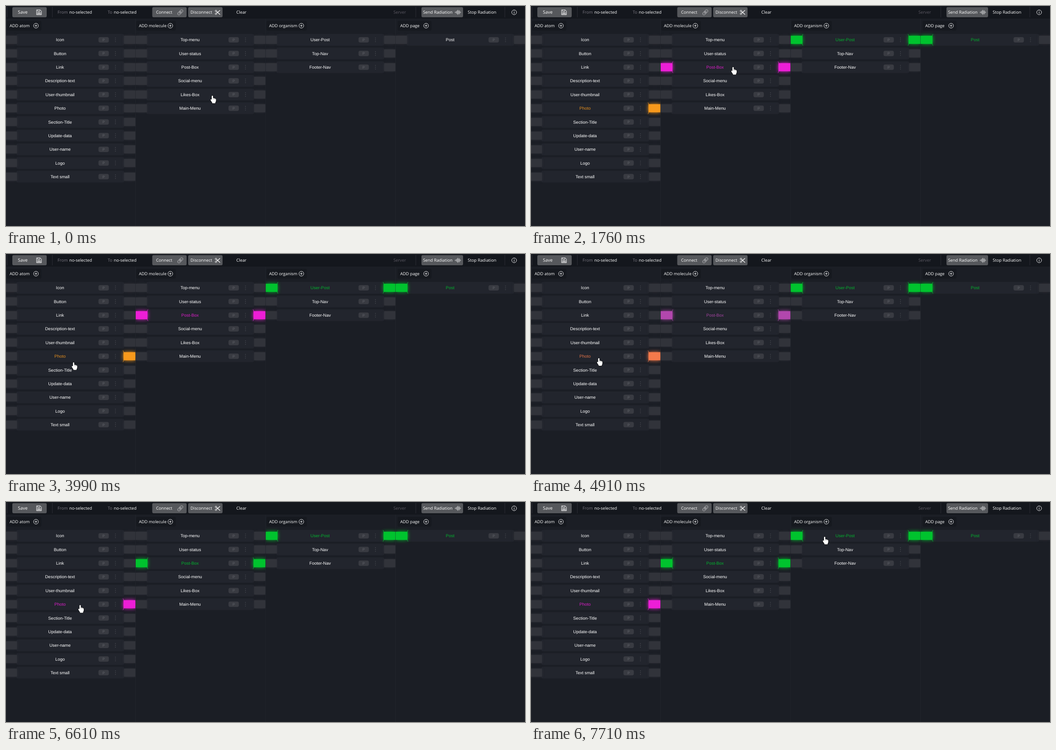
Animation, 1148 px wide and 488 px high, one loop 8 s. Source, as an HTML page with a canvas:

```html
<!DOCTYPE html>
<html lang="en">
<head>
<meta charset="utf-8">
<title>Atomic design board</title>
<style>
  html, body { margin: 0; width: 1148px; height: 488px; overflow: hidden; background: #1b1e25; }
  canvas { display: block; }
</style>
</head>
<body>
<canvas id="stage" width="1148" height="488"></canvas>
<script>
const ctx = document.getElementById('stage').getContext('2d');
const LOOP = 8000, PITCH = 287.6, ROW = 30.36;
const UI = '"Open Sans", "Noto Sans", sans-serif';
const ITEM = '"Liberation Sans", Arial, sans-serif';
const WHITE = [255, 255, 255], GRAY = [49, 51, 58], HOVER = [80, 82, 88];
const GREEN = [0, 195, 46], PINK = [237, 30, 215], ORANGE = [247, 153, 28];

const columns = [
  ['Icon', 'Button', 'Link', 'Description-text', 'User-thumbnail', 'Photo',
    'Section-Title', 'Update-data', 'User-name', 'Logo', 'Text small'],
  ['Top-menu', 'User-status', 'Post-Box', 'Social-menu', 'Likes-Box', 'Main-Menu'],
  ['User-Post', 'Top-Nav', 'Footer-Nav'],
  ['Post'],
];
// Highlight colours: after the first click, then after the second
const links = {
  'Photo': { colors: [ORANGE, PINK], right: true },
  'Post-Box': { colors: [PINK, GREEN], left: true, right: true },
  'User-Post': { colors: [GREEN, GREEN], left: true, right: true },
  'Post': { colors: [GREEN, GREEN], left: true },
};

// Pointer movement: [start, end, steps] and path points [time, x, y]
const moves = [[500, 910, 6], [3360, 4130, 11], [4380, 4530, 3], [4680, 4680, 1], [6550, 7330, 11], [7400, 7710, 5]];
const path = [
  [418, 456.5, 198.5], [500, 456, 194], [828, 448, 141], [910, 447, 135],
  [3283, 447, 135], [3437, 420, 148], [3745, 230, 205], [3899, 165, 234], [3976, 149.5, 240], [4130, 150, 233],
  [4303, 150, 233], [4530, 149.8, 232], [4680, 150, 230.8],
  [6472, 150, 230.8], [6628, 178, 226], [6784, 330, 205], [7018, 561, 165], [7096, 595.7, 136],
  [7174, 612, 120], [7330, 633, 97], [7710, 649.5, 76.8],
];

const rgb = c => `rgb(${c.map(Math.round)})`;
const mix = (a, b, p) => a.map((v, i) => v + (b[i] - v) * p);

function progress(t, start, end, steps) {
  if (t < start) return 0;
  return Math.min(1, (Math.floor((t - start) / (end - start) * (steps - 1) + 1e-6) + 1) / steps);
}

function snap(t) {
  let held = 0;
  for (const [start, end, steps] of moves) {
    if (t < start) break;
    const gap = (end - start) / (steps - 1 || 1);
    held = t >= end ? end : start + Math.floor((t - start) / gap) * gap;
  }
  return held;
}

function pointer(t) {
  const s = snap(t);
  const i = path.findIndex(k => k[0] > s);
  if (i === 0) return path[0].slice(1);
  if (i < 0) return path[path.length - 1].slice(1);
  const a = path[i - 1], b = path[i];
  return mix(a, b, (s - a[0]) / (b[0] - a[0])).slice(1);
}

function text(str, x, y, color, font, size, align = 'left') {
  ctx.font = `${size}px ${font}`;
  ctx.textAlign = align;
  ctx.fillStyle = color;
  ctx.fillText(str, x, Math.round(y));
}

function box(x, y, w, h, r, fill) {
  ctx.fillStyle = fill;
  ctx.beginPath();
  ctx.roundRect(x, y, w, h, r);
  ctx.fill();
}

function stroke(d, color, width = 1) {
  ctx.strokeStyle = color;
  ctx.lineWidth = width;
  ctx.stroke(new Path2D(d));
}

function circle(x, y, r, color) {
  ctx.strokeStyle = color;
  ctx.lineWidth = 1;
  ctx.beginPath();
  ctx.arc(x, y, r, 0, 7);
  ctx.stroke();
}

function at(x, y, draw) {
  ctx.save();
  ctx.translate(x, y);
  draw();
  ctx.restore();
}

function toolbar() {
  box(0, 0, 1148, 28, 0, '#14171d');
  for (const x of [2, 102, 906, 1103]) box(x, 2, 1, 23, 0, '#2a2c33');
  for (const [x, w] of [[14, 76], [323.5, 76], [403, 76], [919, 92]]) box(x, 2.5, w, 22.5, 3, '#56585c');
  const label = (str, x, color = '#fff', size = 9.3) => text(str, x, 17, color, UI, size);
  label('Save', 26.3, '#fff', 9.9);
  label('From', 114, '#7a7781');
  label('no-selected', 140);
  label('To', 225, '#7a7781');
  label('no-selected', 238.5);
  label('Connect', 332);
  label('Disconnect', 408);
  label('Clear', 509.5);
  label('Server', 857, '#5b5962');
  label('Send Radiation', 922.5);
  label('Stop Radiation', 1021.3);

  at(67, 8, () => stroke('M.6 .6H8.8L11.4 3.2V11.4H.6ZM3 .8V4.2H8V.8M2.6 11.2V6.8H9.4V11.2M4 8.4H8M4 9.9H8', '#f2f2f3'));
  at(385.5, 14, () => {
    ctx.rotate(-Math.PI / 4);
    ctx.strokeStyle = '#a3a4a7';
    ctx.lineWidth = 1.1;
    for (const x of [-7, -1.4]) {
      ctx.beginPath();
      ctx.roundRect(x, -2.8, 8.4, 5.6, 2.6);
      ctx.stroke();
    }
    stroke('M-4 0H4', '#a3a4a7');
  });
  at(462, 8.5, () => {
    circle(2.4, 2.4, 1.7, '#fff');
    circle(2.4, 8.8, 1.7, '#fff');
    stroke('M3.7 3.6L11.5 10.4M3.7 7.6L11.5 .9', '#fff', 1.3);
  });
  for (let i = 0; i < 9; i++) {
    const h = [1, 3, 5, 8, 11, 7, 9, 4, 1][i];
    box(992.5 + i * 1.65, 14 - h / 2, 0.9, h, 0, '#d5d6d8');
  }
  circle(1124, 14, 5.3, '#e9e9eb');
  stroke('M1124 13V17M1124 10.8V12', '#e9e9eb', 1.1);
}

function headers() {
  for (const [name, x, icon] of [['atom', 8, 66.3], ['molecule', 294, 363.5], ['organism', 582, 653.3], ['page', 872, 929.2]]) {
    box(x - 6, 33, icon - x + 18, 21.5, 3, '#16191f');
    text('ADD ' + name, x, 47, '#fff', UI, 9.25);
    circle(icon, 43.7, 5.3, '#e9e9eb');
    stroke(`M${icon - 2.8} 43.7h5.6M${icon} 40.9v5.6`, '#e9e9eb');
  }
}

// outer: x of the end at the column border; side: -1 left of the row, 1 right of it
function handle(outer, cy, side, color, lit, bracket) {
  const width = 24.8 + lit;
  const inner = outer - side * width;
  ctx.save();
  ctx.shadowColor = rgb(color);
  ctx.shadowBlur = 5 + 3 * lit;
  box(Math.min(outer, inner), cy - 9, width, 18, 0, rgb(color));
  ctx.restore();
  if (bracket) {
    ctx.save();
    ctx.globalAlpha = bracket.alpha * 0.85;
    const tip = inner - side * 1.8;
    stroke(`M${tip} ${cy - 12.6}Q${inner} ${cy - 12} ${inner} ${cy - 9.5}V${cy + 9.5}Q${inner} ${cy + 12} ${tip} ${cy + 12.6}`,
      rgb(bracket.color), 1);
    ctx.restore();
  }
}

// Hover fades out over the last few pointer positions
function hoverLevel(trail, left, cy) {
  return Math.max(...trail.map(([x, y], i) =>
    x > left && x < left + 25.5 && Math.abs(y - cy) < 9.5 ? [1, 0.35, 0.15][i] : 0));
}

function row(name, x, cy, first, second, trail) {
  const link = links[name];
  const tint = link && mix(link.colors[0], link.colors[1], second);
  box(x + 23, cy - 13, 238, 26, 3, '#22252d');
  for (const [side, outer, key] of [[-1, x - 0.8, 'left'], [1, x + 286, 'right']]) {
    if (link && link[key]) {
      handle(outer, cy, side, mix(GRAY, tint, first), first, first && { color: tint, alpha: first });
    } else {
      const hover = hoverLevel(trail, side < 0 ? outer : outer - 25, cy);
      handle(outer, cy, side, mix(GRAY, HOVER, hover), 0, hover && { color: WHITE, alpha: hover * hover });
    }
  }
  const textTint = link ? mix(WHITE, mix(tint, [34, 37, 45], 0.1), first) : WHITE;
  text(name, x + 119.5, cy + 3.4, rgb(textTint), ITEM, 9.5, 'center');
  box(x + 204.5, cy - 6, 23, 12, 4, '#393b42');
  text('P', x + 216, cy + 2.9, '#62646b', ITEM, 8, 'center');
  for (const dy of [-4, 0, 4]) box(x + 241.3, cy + dy - 0.8, 1.6, 1.6, 0.8, '#53555c');
}

function column(names, x, first, second, trail) {
  ctx.save();
  ctx.beginPath();
  ctx.rect(x - 0.8, 28, PITCH, 460);
  ctx.clip();
  names.forEach((name, i) => row(name, x, 75 + i * ROW, first, second, trail));
  ctx.restore();
}

function hand(x, y) {
  const shape = new Path2D('M-1.5 9V1.2Q0-.8 1.5 1.2V6Q3 5 4 6.4Q5.4 5.8 6.2 7.2Q8 6.8 8 8.6V11.5' +
    'Q8 14 6.5 15.5V17.3H-.3V16Q-2.5 13-4 10.3Q-4.3 8-2.8 8.4Z');
  at(x, y, () => {
    ctx.lineJoin = 'round';
    ctx.strokeStyle = '#000';
    ctx.lineWidth = 1.2;
    ctx.stroke(shape);
    ctx.fillStyle = '#fff';
    ctx.fill(shape);
    stroke('M1.6 6V9M4 6.8V9.2M6.2 7.6V9.4', '#555', 0.5);
  });
}

function draw() {
  const t = performance.now() % LOOP;
  const first = progress(t, 1610, 1760, 3), second = progress(t, 4910, 5140, 4);
  const trail = [0, 78, 156].map(ago => pointer(Math.max(0, t - ago)));
  ctx.textRendering = 'geometricPrecision';
  box(0, 0, 1148, 488, 0, '#1b1e25');
  toolbar();
  headers();
  for (const x of [286, 573.6, 861]) box(x, 28, 1, 460, 0, '#22252c');
  columns.forEach((names, i) => column(names, i * PITCH, first, second, trail));
  hand(...trail[0]);
  requestAnimationFrame(draw);
}
draw();
</script>
</body>
</html>
```
